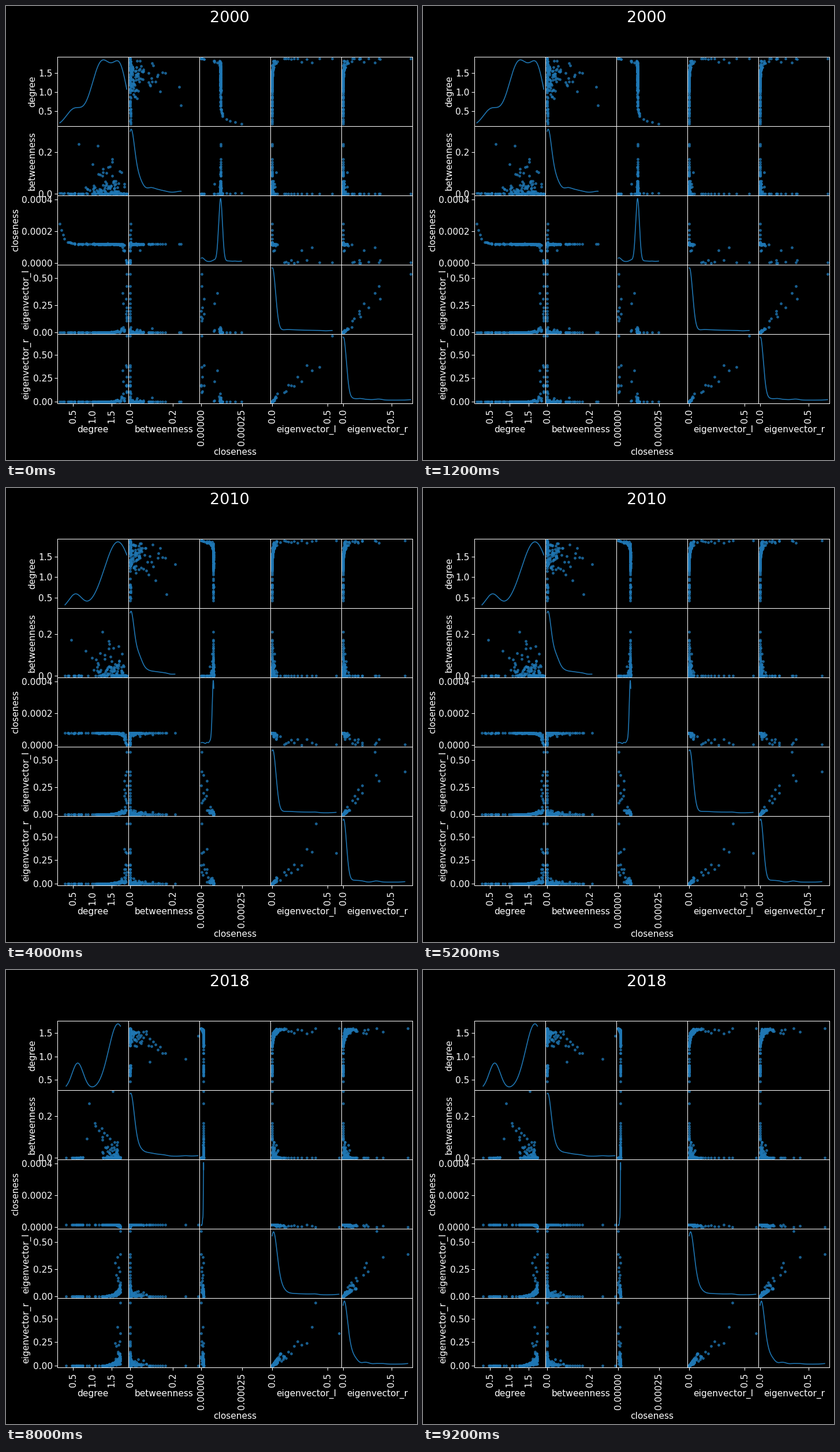
A matplotlib script for the animation above (10000 ms loop, 712 by 786 pixels).

```python
import matplotlib.pyplot as plt
import numpy as np
from matplotlib.animation import FuncAnimation

W, H, DPI = 712, 786, 100
BLUE = "#1f77b4"
PT = 72 / DPI  # points per pixel

plt.style.use("dark_background")
plt.rcParams.update({
    "font.family": "DejaVu Sans",
    "font.size": 15.4 * PT,
    "axes.linewidth": PT,
    "axes.labelpad": 3.4 * PT,
    "xtick.major.size": 5 * PT, "ytick.major.size": 5 * PT,
    "xtick.major.width": PT, "ytick.major.width": PT,
    "xtick.major.pad": 5 * PT, "ytick.major.pad": 3.5 * PT,
})

# Closeness is held in millionths throughout.
NAMES = ["degree", "betweenness", "closeness", "eigenvector_l", "eigenvector_r"]
LIMS = [(.097, 1.933), (-.008, .324), (-10.5, 426), (-.0155, .624), (-.0175, .72)]
XTICKS = [
    ([.5, 1, 1.5], ["0.5", "1.0", "1.5"]),
    ([0, .2], ["0.0", "0.2"]),
    ([0, 250], ["0.00000", "0.00025"]),
    ([0, .5], ["0.0", "0.5"]),
    ([0, .5], ["0.0", "0.5"]),
]
YTICKS = [
    XTICKS[0],
    XTICKS[1],
    ([0, 200, 400], ["0.0000", "0.0002", "0.0004"]),
    ([0, .25, .5], ["0.00", "0.25", "0.50"]),
    ([0, .25, .5], ["0.00", "0.25", "0.50"]),
]

# span: degree range; humps: degree density as (mean, sigma, height);
# main, fall: usual closeness and how fast it drops near the top degree;
# hubs: highest (degree, betweenness); stars: highest (left, right) scores;
# strays: (degree, closeness) off the main line; lift: rise at the low end.
YEARS = {
    2000: dict(span=(.157, 1.888), main=119, fall=.06, lift=1.15,
               humps=[(.52, .2, .25), (1.25, .27, 1), (1.73, .18, .75)],
               hubs=[(.64, .238), (1.14, .229)],
               stars=[(.54, .70), (.427, .37)]),
    2005: dict(span=(.142, 1.873), main=217, fall=.22,
               humps=[(.49, .19, .31), (1.28, .25, .75), (1.75, .2, .85)],
               hubs=[(1.35, .19), (1.345, .168)],
               stars=[(.427, .69), (.508, .213)], strays=[(.37, 245)]),
    2010: dict(span=(.291, 1.89), main=75, fall=.08,
               humps=[(.56, .17, .22), (1.66, .35, 1)],
               hubs=[(1.26, .209), (.455, .17)],
               stars=[(.393, .64), (.575, .327)]),
    2015: dict(span=(.291, 1.836), main=128, fall=.1,
               humps=[(.64, .18, .22), (1.66, .3, 1)],
               hubs=[(.80, .229), (1.31, .234)],
               stars=[(.41, .69), (.607, .322)],
               strays=[(.291, 416), (.487, 347)]),
    2018: dict(span=(.32, 1.724), main=15, fall=.06, floor=.2,
               humps=[(.62, .145, .4), (1.66, .24, 1)],
               hubs=[(1.53, .317), (.92, .259)],
               stars=[(.39, .67), (.60, .345)]),
}


def bells(xs, means, sigma, heights=1):
    parts = heights * np.exp(-((xs[:, None] - means) / sigma) ** 2 / 2)
    return parts.sum(axis=1)


def kde(data, xs):
    return bells(xs, data, data.std() * len(data) ** -.2)


def build(year, span, humps, main, fall, hubs, stars,
          strays=(), lift=0, floor=0, n=130, extra=9):
    """Return nodes (one column per measure) and the five density curves."""
    rng = np.random.default_rng(year)
    lo, hi = span
    grid = np.linspace(lo, hi, 400)
    dens = bells(grid, *np.array(humps).T)

    # The crowd: closeness collapses and eigenvector scores grow near the top.
    cdf = np.cumsum(np.clip(dens - floor, 0, None))
    deg = np.interp(rng.random(n), cdf / cdf[-1], grid)
    deg[0] = lo
    gap = hi - deg
    busy = (deg > .8) & (gap > .06) & (rng.random(n) < .65)
    between = rng.exponential(np.where(busy, .027, .0006))
    drop = np.maximum(np.exp(-gap / .02), np.exp(-gap / fall) * rng.random(n))
    rise = lift * np.exp(-(deg - lo) / .09)
    close = main * (1 - drop + rise) * rng.normal(1, .012, n)
    left = .13 * np.exp(-gap / .11) * rng.uniform(.1, 1, n)
    right = left * rng.uniform(.5, 2, n)
    crowd = np.column_stack([deg, between, close, left, right])

    # Brokers: a thinning tail of betweenness at middling degree.
    k = np.arange(extra)
    zero = 0 * k
    brokers = np.column_stack([rng.normal(hi - .48, .2, extra), .165 * .92 ** k,
                               zero + main, zero, zero])

    # Leaders: a thinning tail of eigenvector scores at the top degree.
    lead = .36 * .86 ** k
    reach = main * rng.random(extra) ** 2
    leaders = np.column_stack([hi - .14 * reach / main, zero, reach, lead,
                               lead * rng.uniform(.65, 1.25, extra)])

    nodes = np.vstack([crowd, brokers, leaders]
                      + [(d, b, main, 0, 0) for d, b in hubs]
                      + [(d, 0, c, 0, 0) for d, c in strays]
                      + [(hi, 0, .03 * main, l, r) for l, r in stars])

    curves = []
    for data, (a, b) in zip(nodes.T, LIMS):
        xs = np.linspace(data.min(), data.max(), 400)
        ys = kde(data, xs) if curves else dens
        ys = (ys - ys.min()) / np.ptp(ys)
        curves.append((xs, a + (b - a) * (1 + 20 * ys) / 22))
    return nodes, curves


SCENES = [(year, spec["span"], *build(year, **spec)) for year, spec in YEARS.items()]

fig, axes = plt.subplots(5, 5, figsize=(W / DPI, H / DPI), dpi=DPI)
fig.subplots_adjust(left=89.2 / W, right=704.2 / W, top=1 - 87.8 / H,
                    bottom=1 - 687.8 / H, wspace=0, hspace=0)
title = fig.text(387 / W, 1 - 28.3 / H, "", fontsize=27 * PT,
                 ha="center", va="baseline")

marks = {}
for (i, j), ax in np.ndenumerate(axes):
    ax.set(xlim=LIMS[j], ylim=LIMS[i], xticks=[], yticks=[])
    if i == j:
        marks[i, j], = ax.plot([], [], color=BLUE, lw=1.6 * PT)
    else:
        marks[i, j] = ax.scatter([], [], s=(4.8 * PT) ** 2, color=BLUE,
                                 alpha=.8, linewidths=0)
    if i == 4:
        ax.set_xticks(*XTICKS[j], rotation=90)
        ax.set_xlabel(NAMES[j])
    if j == 0:
        ax.set_yticks(*YTICKS[i])
        ax.set_ylabel(NAMES[i])


def draw(frame):
    year, (lo, hi), nodes, curves = SCENES[frame]
    title.set_text(str(year))
    for (i, j), mark in marks.items():
        if i == j:
            mark.set_data(*curves[i])
        else:
            mark.set_offsets(nodes[:, [j, i]])

    # The top row's labels follow each year's own degree range.
    pad = .025 * (hi - lo)
    ticks, labels = YTICKS[0]
    share = (np.array(ticks) - lo + pad) / (hi - lo + 2 * pad)
    a, b = LIMS[0]
    axes[0, 0].set_yticks(a + share * (b - a), labels)
    return [title, *marks.values()]


anim = FuncAnimation(fig, draw, frames=len(SCENES), interval=2000,
                     repeat=True, repeat_delay=0, blit=False)
plt.show()
```
